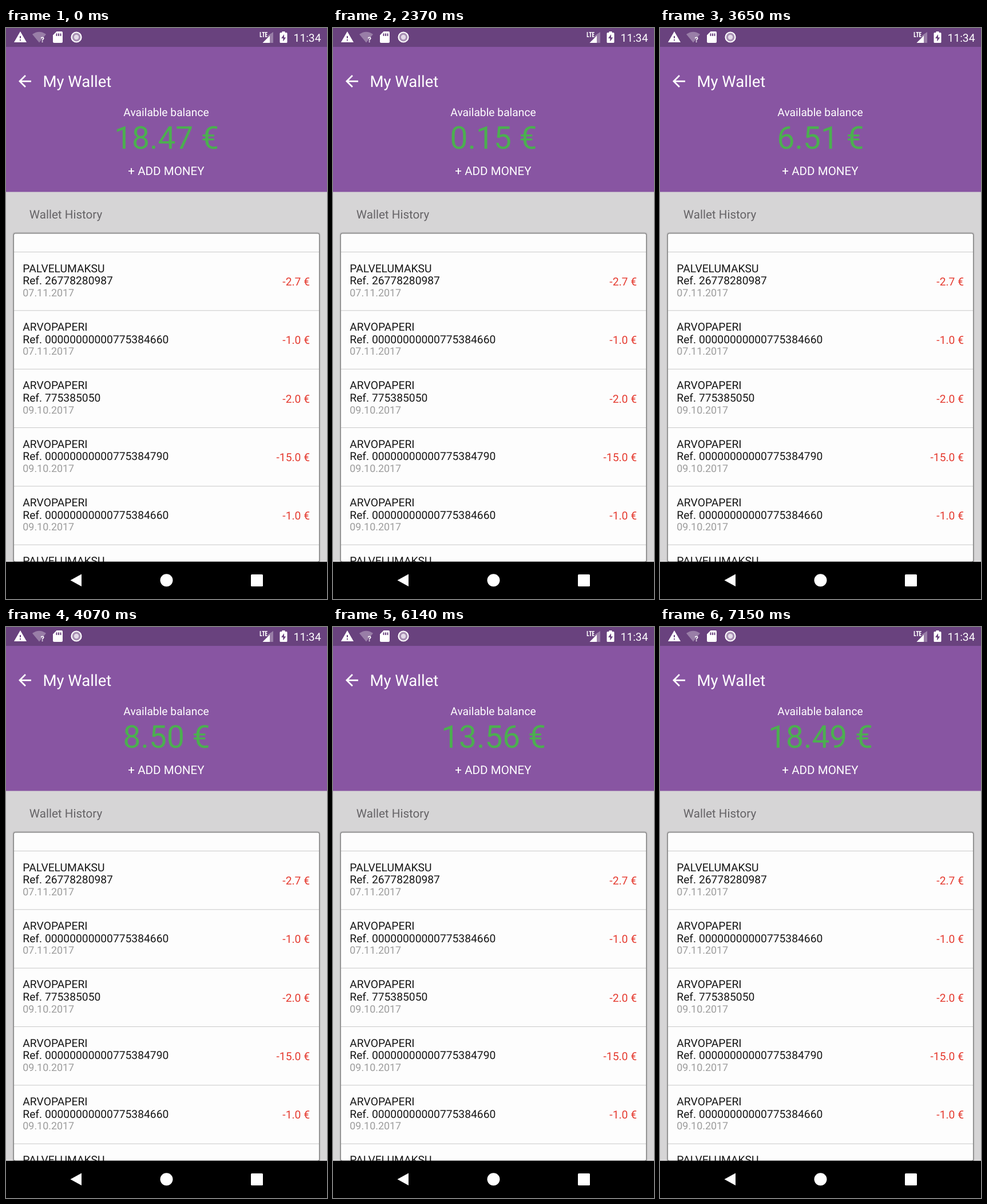
An HTML page for the animation above (7.78 s loop, 561 by 998 pixels).

```html
<!DOCTYPE html>
<html lang="en">
<head>
<meta charset="utf-8">
<title>My Wallet</title>
<style>
html, body { margin: 0; width: 100%; height: 100%; overflow: hidden; background: #000; }
svg { display: block; width: 100vw; height: 100vh; font-family: Roboto, sans-serif; text-rendering: geometricPrecision; }
</style>
</head>
<body>
<svg viewBox="0 0 561 998">
  <defs>
    <clipPath id="view"><rect width="561" height="933"/></clipPath>
    <filter id="soft" x="-5%" y="-5%" width="110%" height="110%"><feGaussianBlur stdDeviation="1.2"/></filter>
  </defs>

  <rect width="561" height="998" fill="#d6d5d6"/>
  <rect width="561" height="286.5" fill="#8855a2"/>
  <rect width="561" height="33" fill="#69427e"/>

  <!-- status bar -->
  <g fill="#fff">
    <path transform="translate(13 4)" d="M1 21h22L12 2zM13 18h-2v-2h2zM13 14h-2v-4h2z" fill-rule="evenodd"/>
    <path d="M46 11Q58 2.500 70 11L58 25.500Z" opacity=".32"/>
    <text x="60.500" y="24.500" font-size="13" font-weight="700">?</text>
    <path d="M88.500 6H97a2 2 0 0 1 2 2V24a2 2 0 0 1-2 2H84a2 2 0 0 1-2-2V12.500ZM87.500 9.500v4.500h2v-4.500zM91 9.500v4.500h2v-4.500zM94.500 9.500v4.500h2v-4.500z" fill-rule="evenodd"/>
    <circle cx="123" cy="16" r="8.500" fill="#a78fb3" stroke="#fff" stroke-width="2.200"/>
    <circle cx="123" cy="16" r="4.200" fill="#e3d9e8"/>
    <path d="M444.500 7v8.200h3M447.500 7.800h5M450 7.800v8.200M456.800 7.800h-3v7.400h3M453.800 11.500h2.600" fill="none" stroke="#fff" stroke-width="1.600"/>
    <path d="M467 7V26H448.500L458 16.300V13Z" opacity=".32"/>
    <path d="M461 13.500V26H448.500Z"/>
    <path d="M482.500 6h5v2H490a1.500 1.500 0 0 1 1.500 1.500V24.500a1.500 1.500 0 0 1-1.500 1.500H480a1.500 1.500 0 0 1-1.500-1.500V9.500A1.500 1.500 0 0 1 480 8h2.500ZM486 11l-5 7h3.300v5.500l5-7H486Z" fill-rule="evenodd"/>
    <text x="550.500" y="23.800" font-size="19.250" text-anchor="end">11:34</text>
  </g>

  <!-- header -->
  <g fill="#fff">
    <path transform="translate(16.500 76.500) scale(1.375)" d="M20 11H7.830l5.590-5.590L12 4l-8 8 8 8 1.410-1.410L7.830 13H20z"/>
    <text x="64.500" y="102.500" font-size="27.500">My Wallet</text>
    <g text-anchor="middle">
      <text x="280" y="154.300" font-size="19.250">Available balance</text>
      <text id="balance" x="280.500" y="210.500" font-size="55"></text>
      <text x="280" y="257" font-size="20.600">+ ADD MONEY</text>
    </g>
  </g>

  <!-- history -->
  <text x="40.800" y="333.300" font-size="20.600" fill="#656366">Wallet History</text>
  <g clip-path="url(#view)">
    <rect x="13" y="358.500" width="535" height="576" rx="3" fill="#555" filter="url(#soft)"/>
    <rect x="14" y="359.500" width="533" height="573" rx="2.500" fill="#fdfdfd"/>
    <g id="rows"></g>
  </g>

  <!-- navigation bar -->
  <rect y="933" width="561" height="65" fill="#000"/>
  <g fill="#fff">
    <path d="M112.500 965.300L132 954.500V976Z"/>
    <circle cx="280.500" cy="965.300" r="11"/>
    <rect x="428" y="955" width="21" height="21" rx="1.500"/>
  </g>
</svg>
<script>
const LOOP = 7780;
const RED = '#f44336', GREEN = '#4caf50';
const balance = document.getElementById('balance');

const entries = [
  ['PALVELUMAKSU', '26778280987', '07.11.2017', '-2.7'],
  ['ARVOPAPERI', '00000000000775384660', '07.11.2017', '-1.0'],
  ['ARVOPAPERI', '775385050', '09.10.2017', '-2.0'],
  ['ARVOPAPERI', '00000000000775384790', '09.10.2017', '-15.0'],
  ['ARVOPAPERI', '00000000000775384660', '09.10.2017', '-1.0'],
  ['PALVELUMAKSU', '', '', '']
];

const text = (x, y, size, fill, str, anchor = 'start') =>
  `<text x="${x}" y="${y}" font-size="${size}" fill="${fill}" text-anchor="${anchor}">${str}</text>`;

document.getElementById('rows').innerHTML = entries.map(([name, ref, date, sum], i) => {
  const y = 391.5 + i * 102.35;
  let row = `<path d="M14 ${y}H547" stroke="#c9c9c9"/>` + text(29.3, y + 35.2, 19.25, '#161616', name);
  if (ref) {
    row += text(29.3, y + 56.9, 19.25, '#161616', 'Ref. ' + ref)
      + text(29.3, y + 77.3, 17.9, '#9c9c9c', date)
      + text(531, y + 58.4, 19.25, '#e53a2f', sum + ' €', 'end');
  }
  return row;
}).join('');

// Each count ticks on its own frame grid and passes through [time, value] points.
const counts = [
  { start: 0, grid: 70, step: 40.75, end: 1010, points: [[0, 18.47], [1000, -1.49]] },
  { start: 2050, grid: 2370, step: 41.29, end: 4070, points: [[2040, -1.49], [2370, 0.15], [3650, 6.51], [4070, 8.5]] },
  { start: 5110, grid: 5360, step: 41.05, end: 7150, points: [[5100, 8.5], [5360, 9.54], [6140, 13.56], [7150, 18.49]] }
];

function along(points, t) {
  if (t <= points[0][0]) return points[0][1];
  for (let i = 1; i < points.length; i++) {
    const [t0, v0] = points[i - 1], [t1, v1] = points[i];
    if (t <= t1) return v0 + (v1 - v0) * (t - t0) / (t1 - t0);
  }
  return points[points.length - 1][1];
}

function valueAt(t) {
  const c = counts.filter(k => t >= k.start).pop();
  if (t >= c.end) return c.points[c.points.length - 1][1];
  const tick = c.grid + Math.floor((t - c.grid + 0.5) / c.step) * c.step;
  return along(c.points, c.start === 0 && t < c.grid ? 0 : tick);
}

function draw(t) {
  const v = valueAt(t);
  balance.textContent = v.toFixed(2) + ' €';
  balance.setAttribute('fill', v < 0 ? RED : GREEN);
}

let origin = null;
function frame(now) {
  if (origin === null) origin = now;
  draw(Math.max(0, now - origin) % LOOP);
  requestAnimationFrame(frame);
}
draw(0);
requestAnimationFrame(frame);
</script>
</body>
</html>
```
